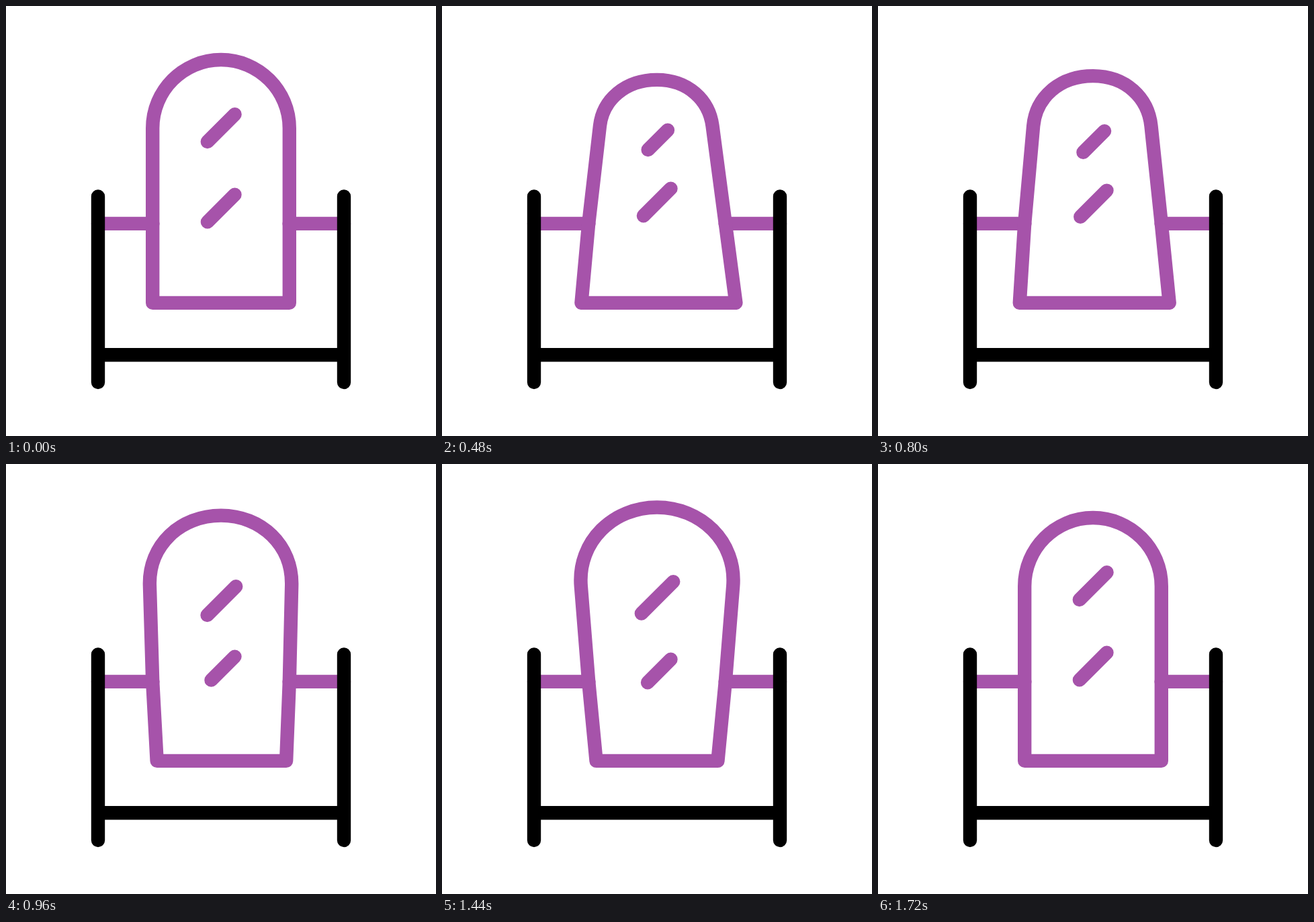
Animation of 640x640 px, one loop 2 s. Source, as an HTML page:

```html
<!DOCTYPE html>
<html lang="en">
<head>
<meta charset="utf-8">
<title>Tilting mirror</title>
<style>
html, body { margin: 0; width: 100%; height: 100%; overflow: hidden; background: #fff; }
svg { display: block; width: 100%; height: 100%; }
path { fill: none; stroke-width: 20.4; stroke-linecap: round; stroke-linejoin: round; }
.glass { stroke: #a653aa; }
.stand { stroke: #000; }
</style>
</head>
<body>
<svg viewBox="0 0 640 640">
  <path class="glass" d="M137 323.9H218.4M421.6 323.9H503"/>
  <path class="glass" id="frame"/>
  <path class="glass" id="shine"/>
  <path class="stand" d="M137 283.5V560M503 283.5V560M137 519.2H503"/>
</svg>
<script>
const LOOP = 2000;
const CENTER = 320, HINGE = 323.9, HALF = 101.8, BASE = 441.9;
const BACK = 145, FORE = 640, HOME = 1180, REST = 1700;

const frame = document.getElementById("frame");
const shine = document.getElementById("shine");

const easeIn = u => u ** 2;
const easeOut = u => 1 - easeIn(1 - u);
const easeInOut = u => u < 0.5 ? (2 * u) ** 2.1 / 2 : 1 - (2 - 2 * u) ** 2.1 / 2;
const span = (t, from, to) => Math.min(1, Math.max(0, (t - from) / (to - from)));

// One half of the mirror, side = -1 (left) or 1 (right).
// The dome leaves the shoulder along the line of the side below it.
function half(side, mix) {
  const top = mix(80, 33.3, -20.8);
  const wide = mix(HALF, -20.1, 15.2) + side * mix(0, -1.4, 0);
  const foot = mix(HALF, 14.7, -15.2) + side * mix(0, 2.7, 0);
  const shoulder = mix(182, -4, 0);
  const round = mix(0.552, 0.01, 0.025);
  const rise = round * (shoulder - top);
  const lean = rise * (HALF - wide) / (HINGE - shoulder);
  const x = d => CENTER + side * d;
  return `M${CENTER} ${top}C${x(round * wide)} ${top} ${x(wide - lean)} ${shoulder - rise} ` +
    `${x(wide)} ${shoulder}L${x(HALF)} ${HINGE}L${x(foot)} ${BASE}H${CENTER}`;
}

// Diagonal glint hanging down and left from its upper end.
const glint = (x, y, size) => `M${x} ${y}l${-size} ${size}`;

function draw(t) {
  const back = easeOut(span(t, BACK, FORE));
  const turn = easeInOut(span(t, FORE, HOME));
  const home = easeIn(span(t, HOME, REST));
  // Upright value plus its change when leaning fully back or fully forward.
  const mix = (rest, atBack, atFore) =>
    rest + atBack * (back - turn) + atFore * (turn - home);

  frame.setAttribute("d", half(-1, mix) + half(1, mix));
  shine.setAttribute("d",
    glint(mix(340.6, -5.2, 4.9), mix(161.2, 26.2, 18.6), mix(40.8, -12.8, 8.9)) +
    glint(340.5, mix(280.8, -10.2, 13.4), mix(40.6, 0, -8.2)));
}

const start = performance.now();
function tick() {
  draw((performance.now() - start) % LOOP);
  requestAnimationFrame(tick);
}
tick();
</script>
</body>
</html>
```
